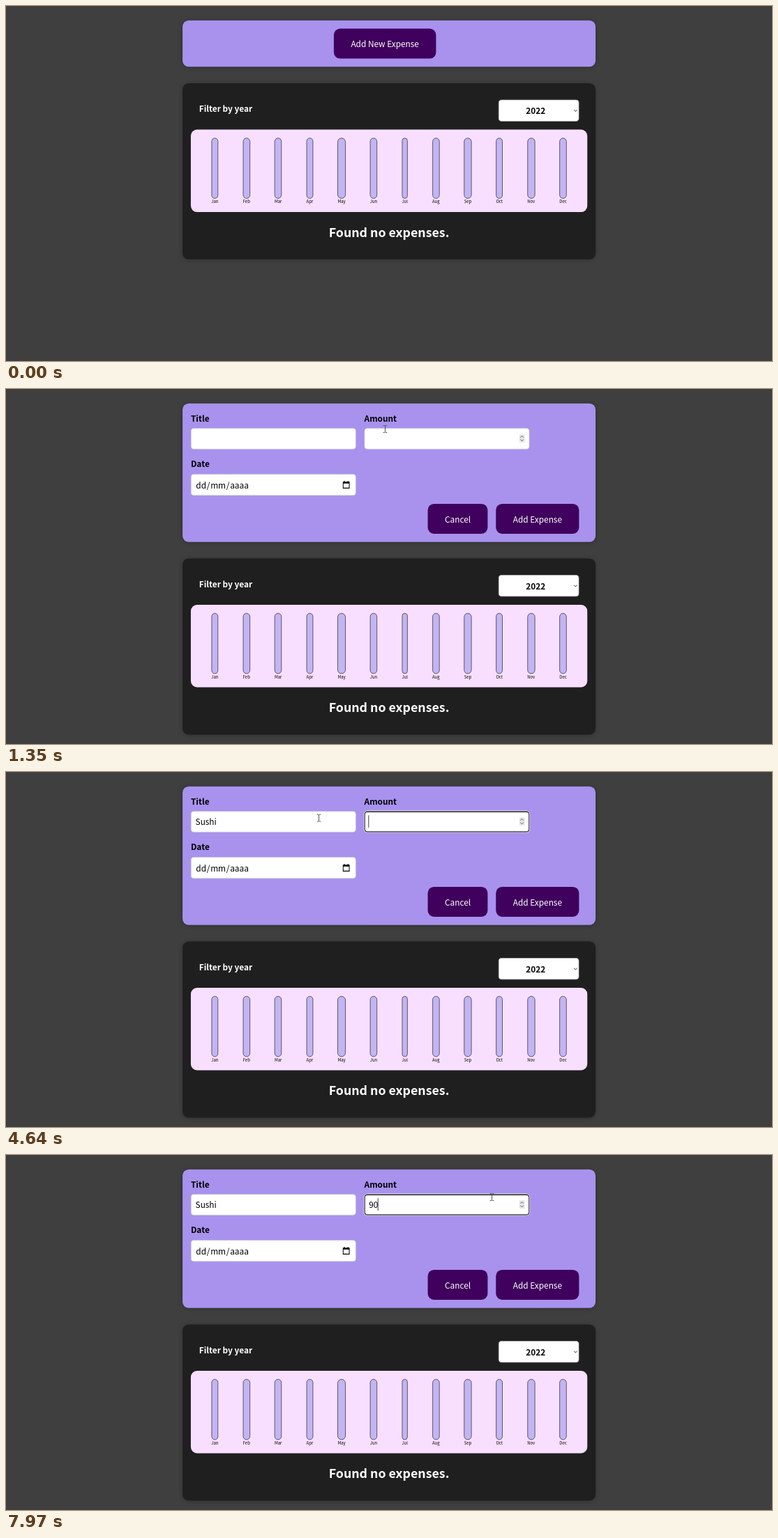
Write an HTML page that moves like this. It is 1098x510 px and loops after 8000 ms.

```html
<!DOCTYPE html>
<html lang="en">
<head>
<meta charset="utf-8">
<title>Expenses</title>
<style>
* { box-sizing: border-box; }
html, body { margin: 0; width: 100%; height: 100%; overflow: hidden; background: #3f3f3f; }
#page { position: absolute; left: 0; top: 0; width: 1484px; height: 690px; padding-top: 28px; transform: scale(.74); transform-origin: 0 0;
  font: 16px/24px "Noto Sans CJK JP", "Noto Sans CJK SC", "Noto Sans CJK", "Noto Sans", sans-serif; }
.card { width: 800px; margin: 0 auto 32px; padding: 16px; border-radius: 12px; box-shadow: 0 1px 8px rgba(0,0,0,.25); }
#top { background: #a892ee; }
#start { text-align: center; }
#list { height: 342px; background: #1f1f1f; color: #fff; }
.btn { display: inline-block; padding: 17px 33px; margin-right: 16px; border-radius: 12px; background: #40005d; color: #fff; vertical-align: top; }
.btn.hover { background: #510674; }
.controls { display: flex; flex-wrap: wrap; gap: 16px; margin-bottom: 16px; }
.actions { text-align: right; }
.label, .select, h2 { font-weight: 700; }
.label { margin-bottom: 8px; }
.field { position: relative; width: 320px; height: 41px; padding: 7px 8px; background: #fff; border: 1px solid #ccc; border-radius: 6px; }
.field.date { height: 42px; padding-top: 8px; }
.field.focus { border-color: #101010; box-shadow: inset 0 0 0 1px #101010, 0 0 0 1px #fff; }
.field i { display: inline-block; width: 1.2px; height: 24px; margin-left: -.8px; background: #000; vertical-align: top; }
.field b { font-weight: 400; padding: 0 1px; }
.field svg, .select svg { position: absolute; }
.filter { display: flex; justify-content: space-between; align-items: center; padding: 0 16px; margin: 16px 0; }
.select { position: relative; width: 156px; height: 42px; padding: 8px 52px; background: #fff; color: #000; border: 1px solid #bbb; border-radius: 6px; }
.chart { height: 160px; padding: 16px; border-radius: 12px; background: #f8dfff; display: flex; justify-content: space-around; }
.chart p { margin: 0; font-size: 8px; line-height: 12px; text-align: center; color: #000; }
.chart p::before { content: ""; display: block; height: 116px; border: 1px solid #313131; border-radius: 12px; background: #c3b4f3; }
h2 { margin: 20px 0; font-size: 24px; line-height: 35px; text-align: center; }
#cursor { position: absolute; left: 0; top: 0; overflow: visible; }
</style>
</head>
<body>
<div id="page">
  <div id="top" class="card">
    <div id="start"><div id="add" class="btn">Add New Expense</div></div>
    <div id="form">
      <div class="controls">
        <div><div class="label">Title</div><div class="field" id="title"><span></span></div></div>
        <div><div class="label">Amount</div><div class="field" id="amount"><span></span>
          <svg id="spin" style="right:8px;top:11px" width="11" height="16" fill="none" stroke="#555">
            <rect width="11" height="16" fill="#e6e6e6" stroke="none"/>
            <path d="M2.5 6l3-3 3 3M2.5 10l3 3 3-3" stroke-width="1.3"/>
          </svg></div></div>
        <div><div class="label">Date</div><div class="field date"><b>dd</b>/<b>mm</b>/<b>aaaa</b>
          <svg style="right:11px;top:12px" width="14" height="16" fill="none" stroke="#000">
            <path d="M1 3h12v11.5H1zM1 4.5h12M3.5 .5v3M10.5 .5v3" stroke-width="1.6"/>
          </svg></div></div>
      </div>
      <div class="actions"><div class="btn">Cancel</div><div class="btn">Add Expense</div></div>
    </div>
  </div>
  <div id="list" class="card">
    <div class="filter">
      <div class="label">Filter by year</div>
      <div class="select">2022<svg style="left:144px;top:17px" width="9" height="7" fill="none" stroke="#777"><path d="M1 1.5l3.2 3.2 3.2-3.2" stroke-width="1.4"/></svg></div>
    </div>
    <div class="chart"></div>
    <h2>Found no expenses.</h2>
  </div>
</div>
<svg id="cursor" width="1" height="1">
  <circle id="click" r="9" fill="#c8aa00" fill-opacity=".6"/>
  <path id="arrow" d="M0 0v12.5l2.9-2.7 1.9 4.3 1.9-.8-1.9-4.2h4z" fill="#fff" stroke="#000" stroke-width=".7"/>
  <path id="hand" d="M-1.2 1.2Q0-.8 1.2 1.2V5l5 1.2q1.2.4 1.1 1.8l-.8 3.6-.8 2.2H-.4L-3.8 9q-.4-1.6 1-1.3l1.6 1.2z" fill="#fff" stroke="#222" stroke-width=".6"/>
  <path id="beam" d="M-2.8-5h2.1l.7.6.7-.6h2.1M-2.8 5h2.1l.7-.6.7.6h2.1M0-4.4v8.8" fill="none" stroke="#555"/>
</svg>
<script>
const $ = id => document.getElementById(id);
const show = (id, on) => $(id).style.display = on ? "" : "none";
const mix = (a, b, p) => a + (b - a) * p;
const smooth = p => (1 - Math.cos(Math.PI * p)) / 2;

document.querySelector(".chart").innerHTML =
  "Jan Feb Mar Apr May Jun Jul Aug Sep Oct Nov Dec".split(" ").map(m => `<p>${m}</p>`).join("");

// The pointer advances in even steps.
function progress(t, start, end, steps) {
  const k = Math.floor((t - start) / (end - start) * steps + 1e-6);
  return smooth(Math.min(1, Math.max(0, k / steps)));
}

function pointer(t) {
  if (t < 1080) {
    const p = progress(t, 70, 630, 8);
    return [mix(996, 542, p), mix(451, 58, p)];
  }
  if (t < 1350) return [541, 57];
  if (t < 2740) {
    const p = progress(t, 1350, 1680, 5);
    return [mix(543.5, 450.5, p), mix(57.5, 63, p)];
  }
  if (t < 2880) return [449.5, 63];
  const p = progress(t, 7480, 7970, 7);
  return [mix(448.5, 696.5, p), mix(66, 60.5, p) - 5 * Math.sin(Math.PI * p)];
}

const typed = (text, times, t) => text.slice(0, times.filter(k => t >= k).length);

function setField(id, text, focus, caret) {
  const field = $(id), span = field.firstElementChild;
  field.className = focus ? "field focus" : "field";
  const html = text + (focus && caret ? "<i></i>" : "");
  if (span.innerHTML !== html) span.innerHTML = html;
}

function draw(t) {
  const open = t >= 1350, [x, y] = pointer(t);
  show("start", !open);
  show("form", open);

  const overAdd = !open && t >= 70 && x > 471 && x < 615 && y > 32 && y < 75;
  $("add").className = overAdd ? "btn hover" : "btn";

  const inTitle = t >= 2880 && t < 4640, inAmount = t >= 4640;
  // The caret blinks from the latest key press.
  const key = [2880, 3660, 3920, 4050, 4180, 4310, 4640, 6360, 6560].filter(k => t >= k).pop();
  const period = key === 2880 ? 520 : key === 4640 ? 460 : 530;
  const age = t - key;
  const caret = age < period || Math.floor((age - period) / 530) % 2 === 1;
  setField("title", typed("Sushi", [3660, 3920, 4050, 4180, 4310], t), inTitle, caret);
  setField("amount", typed("90", [6360, 6560], t), inAmount, caret);
  show("spin", !inTitle);

  const overField = open && (x < 502 || x > 514);
  $("cursor").style.transform = `translate(${x}px,${y}px)`;
  show("cursor", t >= 70);
  show("hand", overAdd);
  show("beam", overField);
  show("arrow", !overAdd && !overField);
  show("click", t >= 1280 && t < 1350 || t >= 2880 && t < 2940);
}

function frame() {
  draw(performance.now() % 8000);
  requestAnimationFrame(frame);
}
frame();
</script>
</body>
</html>
```
